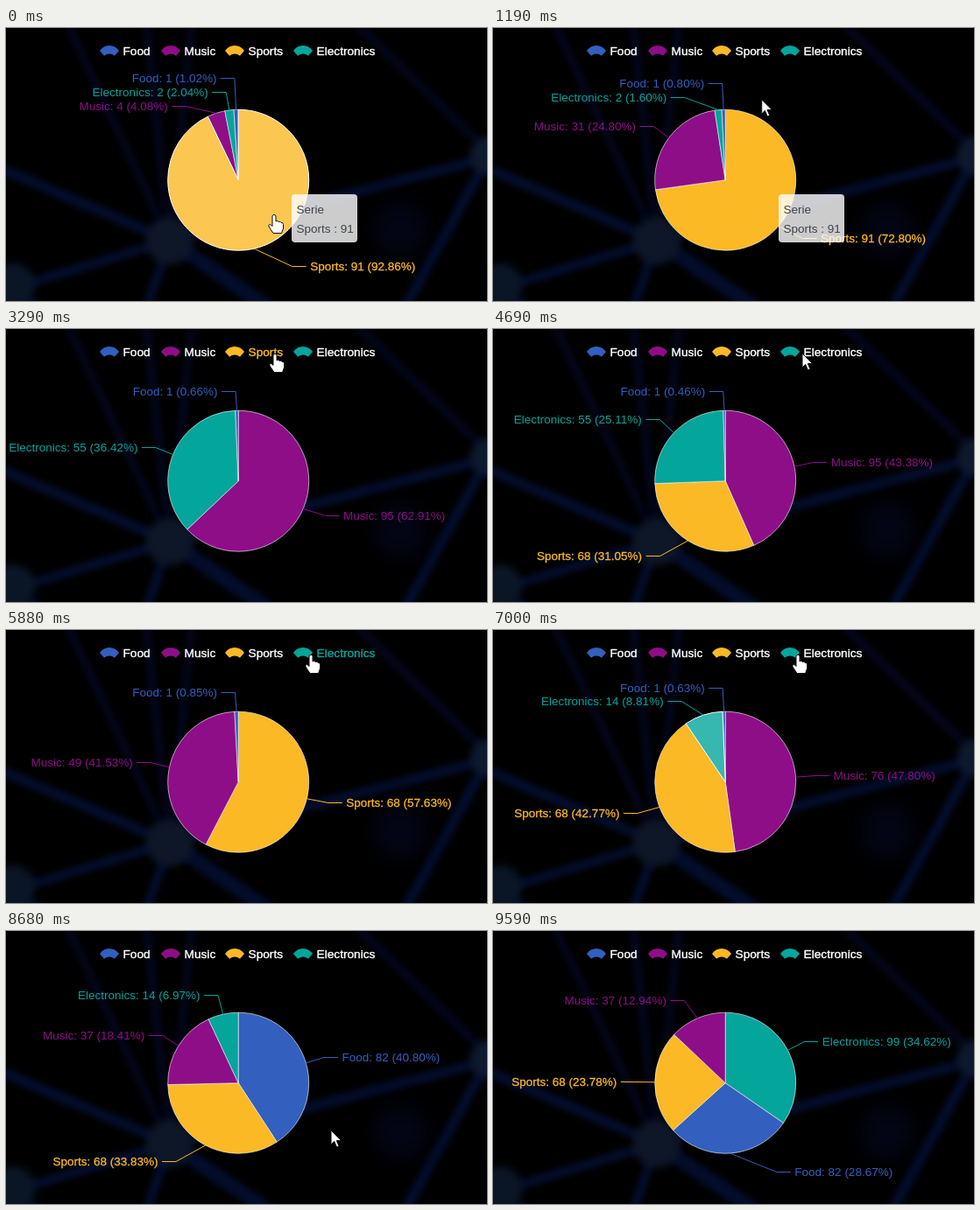
These frames come from a looping animation (549x312 px, 9800 ms). An HTML page with a canvas:

```html
<!DOCTYPE html>
<html lang="en">
<head>
<meta charset="utf-8">
<title>Live pie chart</title>
<style>
  html, body { margin: 0; width: 100%; height: 100%; overflow: hidden; background: #000; }
  canvas { display: block; }
</style>
</head>
<body>
<canvas id="stage" width="549" height="312"></canvas>
<script>
const canvas = document.getElementById('stage');
const ctx = canvas.getContext('2d');
const LOOP = 9800, STEP = 70;
const CX = 265.2, CY = 173.7, RADIUS = 80.5;
const LABEL_CY = 173, LABEL_RADIUS = 102;
const FAMILY = '"Liberation Sans", Arial, sans-serif';
const LABEL_FONT = `13.5px ${FAMILY}`, LEGEND_FONT = `13.7px ${FAMILY}`;

const SERIES = {
  Food:        { color: '#335fbe', light: '#5b7fcb', x: 107 },
  Music:       { color: '#8e0e88', light: '#a53e9f', x: 177 },
  Sports:      { color: '#fab925', light: '#fbc751', x: 250 },
  Electronics: { color: '#04a59b', light: '#36b7af', x: 328 }
};

// One value changes at each tick; clicks on the legend hide or show a series.
const START = { Food: 1, Music: 4, Sports: 91, Electronics: 2 };
const TICKS = [
  [630, 'Music', 31], [1470, 'Sports', 64], [2380, 'Music', 95], [3290, 'Electronics', 55],
  [4200, 'Sports', 68], [5110, 'Music', 49], [5950, 'Electronics', 14], [6860, 'Music', 76],
  [7770, 'Food', 82], [8680, 'Music', 37], [9590, 'Electronics', 99]
];
const HIDDEN = [[1820, 3430, 'Sports'], [5880, 7000, 'Electronics']];
const HOVERED = [
  [0, 1120, 'Sports'], [1470, 4410, 'Sports'],
  [4480, 4690, 'Electronics'], [5180, 7420, 'Electronics']
];
const TOOLTIP_END = 1680;
const POINTER_END = 9520;
const POINTER = [
  [0, 306, 213], [560, 306, 213], [1540, 307, 28], [4270, 307, 28], [4620, 358, 28],
  [4690, 353, 28], [5040, 353, 28], [5250, 348, 28], [7280, 348, 28], [7770, 352, 188],
  [8260, 371, 228], [9100, 371, 228], [POINTER_END, 505, 318]
];

const ICON = new Path2D('M0 26 C5 18 17 18 22 26 L17 31.7 Q11 27.5 5 31.7 Z');
const HAND = new Path2D('M-2 1.5 Q0 -1 2 1.5 V8 Q4 6.5 5.2 8.5 Q7 7.5 8 9.5 Q10 8.5 10.5 11.5 ' +
  'V16 L8.5 21.5 H-1 L-6 14 Q-6.5 10.5 -3.5 12 L-2 13.5 Z');
const ARROW = new Path2D('M0 0 V16 L3.7 12.5 L6.5 19 L9 18 L6.3 11.5 H11.5 Z');

const activeAt = (spans, t) => spans.find(([from, to]) => t >= from && t < to)?.[2];

function text(str, x, y, color, align = 'left', weight = 0) {
  ctx.textAlign = align;
  ctx.fillStyle = ctx.strokeStyle = color;
  ctx.fillText(str, x, y);
  if (weight) {
    ctx.lineWidth = weight;
    ctx.strokeText(str, x, y);
  }
}

function makeBackdrop() {
  const layer = document.createElement('canvas');
  layer.width = canvas.width;
  layer.height = canvas.height;
  const g = layer.getContext('2d');
  g.fillStyle = '#000';
  g.fillRect(0, 0, layer.width, layer.height);

  const line = (x1, y1, x2, y2, width, color) => {
    g.strokeStyle = color;
    g.lineWidth = width;
    g.beginPath();
    g.moveTo(x1, y1);
    g.lineTo(x2, y2);
    g.stroke();
  };
  const blob = (x, y, r, color) => {
    g.fillStyle = color;
    g.beginPath();
    g.arc(x, y, r, 0, 7);
    g.fill();
  };
  const FAR = '#03061a', NEAR = '#030d2a';

  g.filter = 'blur(3px)';
  line(187, 243, 70, -5, 9, FAR);
  line(187, 243, 160, -5, 10, FAR);
  line(187, 243, 212, -5, 9, FAR);
  line(549, 140, 400, -5, 10, FAR);
  line(187, 243, -5, 161, 12, NEAR);
  line(187, 243, 5, 298, 11, NEAR);
  line(187, 243, 555, 147, 12, NEAR);
  line(187, 243, 300, 320, 17, NEAR);
  line(187, 243, 160, 320, 11, NEAR);
  line(549, 150, 455, 320, 12, NEAR);
  line(5, 298, 40, 320, 11, NEAR);
  g.filter = 'blur(12px)';
  blob(450, 230, 30, '#030516');
  g.filter = 'blur(4px)';
  blob(187, 243, 27, '#0e1728');
  blob(8, 294, 25, '#0a1626');
  blob(552, 146, 22, '#0d1a2e');
  return layer;
}
const backdrop = makeBackdrop();

function slicesAt(t) {
  const values = { ...START };
  for (const [time, name, value] of TICKS) if (t >= time) values[name] = value;
  const hidden = activeAt(HIDDEN, t);
  const shown = Object.entries(values)
    .filter(([name]) => name !== hidden)
    .sort((a, b) => b[1] - a[1]);
  const total = shown.reduce((sum, [, value]) => sum + value, 0);

  let before = 0;
  return shown.map(([name, value]) => {
    const mid = (before + value / 2) / total;
    const angle = mid * 2 * Math.PI;
    const slice = {
      name, angle,
      from: before / total * 2 * Math.PI,
      to: (before + value) / total * 2 * Math.PI,
      side: mid < 0.5 ? 1 : -1,
      y: LABEL_CY - LABEL_RADIUS * Math.cos(angle),
      label: `${name}: ${value} (${(value / total * 100).toFixed(2)}%)`
    };
    before += value;
    return slice;
  });
}

// Push overlapping labels on one side apart by equal amounts.
function spreadLabels(slices, gap = 15.7) {
  for (const side of [-1, 1]) {
    const list = slices.filter(s => s.side === side).sort((a, b) => a.y - b.y);
    for (let pass = 0; pass < 40; pass++) {
      for (let i = 1; i < list.length; i++) {
        const push = Math.max(0, gap - (list[i].y - list[i - 1].y)) / 2;
        list[i - 1].y -= push;
        list[i].y += push;
      }
    }
  }
}

function drawSlice({ name, from, to }, hovered) {
  const { color, light } = SERIES[name];
  ctx.beginPath();
  ctx.moveTo(CX, CY);
  ctx.arc(CX, CY, RADIUS, from - Math.PI / 2, to - Math.PI / 2);
  ctx.closePath();
  ctx.fillStyle = hovered ? light : color;
  ctx.fill();
  ctx.lineWidth = 1;
  ctx.strokeStyle = hovered ? '#fff' : 'rgba(255,255,255,.6)';
  ctx.stroke();
}

function drawLabel({ name, angle, side, y, label }) {
  const { color } = SERIES[name];
  const dy = Math.abs(y - 7.5 - CY);
  const reach = dy < 104.5
    ? Math.sqrt(119.7 ** 2 - dy ** 2)
    : LABEL_RADIUS * Math.abs(Math.sin(angle)) + 17;
  const end = CX + side * reach;
  const row = Math.round(y);
  ctx.beginPath();
  ctx.moveTo(CX + RADIUS * Math.sin(angle), CY - RADIUS * Math.cos(angle));
  ctx.lineTo(end - side * 16, row + 0.5);
  ctx.lineTo(end, row + 0.5);
  ctx.lineWidth = 1;
  ctx.strokeStyle = color;
  ctx.stroke();
  text(label, end + side * 4.5, row + 5, color, side > 0 ? 'left' : 'right', name === 'Sports' ? 0.3 : 0);
}

function drawLegend(hidden) {
  ctx.font = LEGEND_FONT;
  for (const [name, { color, x }] of Object.entries(SERIES)) {
    ctx.save();
    ctx.translate(x, 0);
    ctx.fillStyle = color;
    ctx.fill(ICON);
    ctx.restore();
    text(name, x + 26.5, 31, name === hidden ? color : '#fff', 'left', 0.4);
  }
}

function drawTooltip() {
  ctx.font = LABEL_FONT;
  ctx.fillStyle = 'rgba(255,255,255,.8)';
  ctx.beginPath();
  ctx.roundRect(326, 190, 75, 55, 4);
  ctx.fill();
  text('Serie', 331.5, 212, '#40444c');
  text('Sports : 91', 331.5, 234, '#40444c');
}

function drawPointer(t, shape) {
  const i = POINTER.findIndex(([time]) => time > t);
  const [t0, x0, y0] = POINTER[i - 1];
  const [t1, x1, y1] = POINTER[i];
  const p = (t - t0) / (t1 - t0);
  const ease = p * p * (3 - 2 * p);
  ctx.save();
  ctx.translate(x0 + (x1 - x0) * ease, y0 + (y1 - y0) * ease);
  ctx.fillStyle = '#fff';
  ctx.strokeStyle = '#111';
  ctx.lineWidth = 1;
  ctx.fill(shape);
  ctx.stroke(shape);
  ctx.restore();
}

function draw(t) {
  const hovered = activeAt(HOVERED, t);
  const slices = slicesAt(t);
  spreadLabels(slices);
  ctx.lineJoin = 'round';
  ctx.drawImage(backdrop, 0, 0);
  for (const slice of slices) if (slice.name !== hovered) drawSlice(slice, false);
  for (const slice of slices) if (slice.name === hovered) drawSlice(slice, true);
  ctx.font = LABEL_FONT;
  slices.forEach(drawLabel);
  drawLegend(activeAt(HIDDEN, t));
  if (t < TOOLTIP_END) drawTooltip();
  if (t < POINTER_END) drawPointer(t, hovered ? HAND : ARROW);
}

const begin = performance.now();
function frame() {
  const t = (performance.now() - begin) % LOOP;
  draw(Math.floor(t / STEP) * STEP);
  requestAnimationFrame(frame);
}
frame();
</script>
</body>
</html>
```
